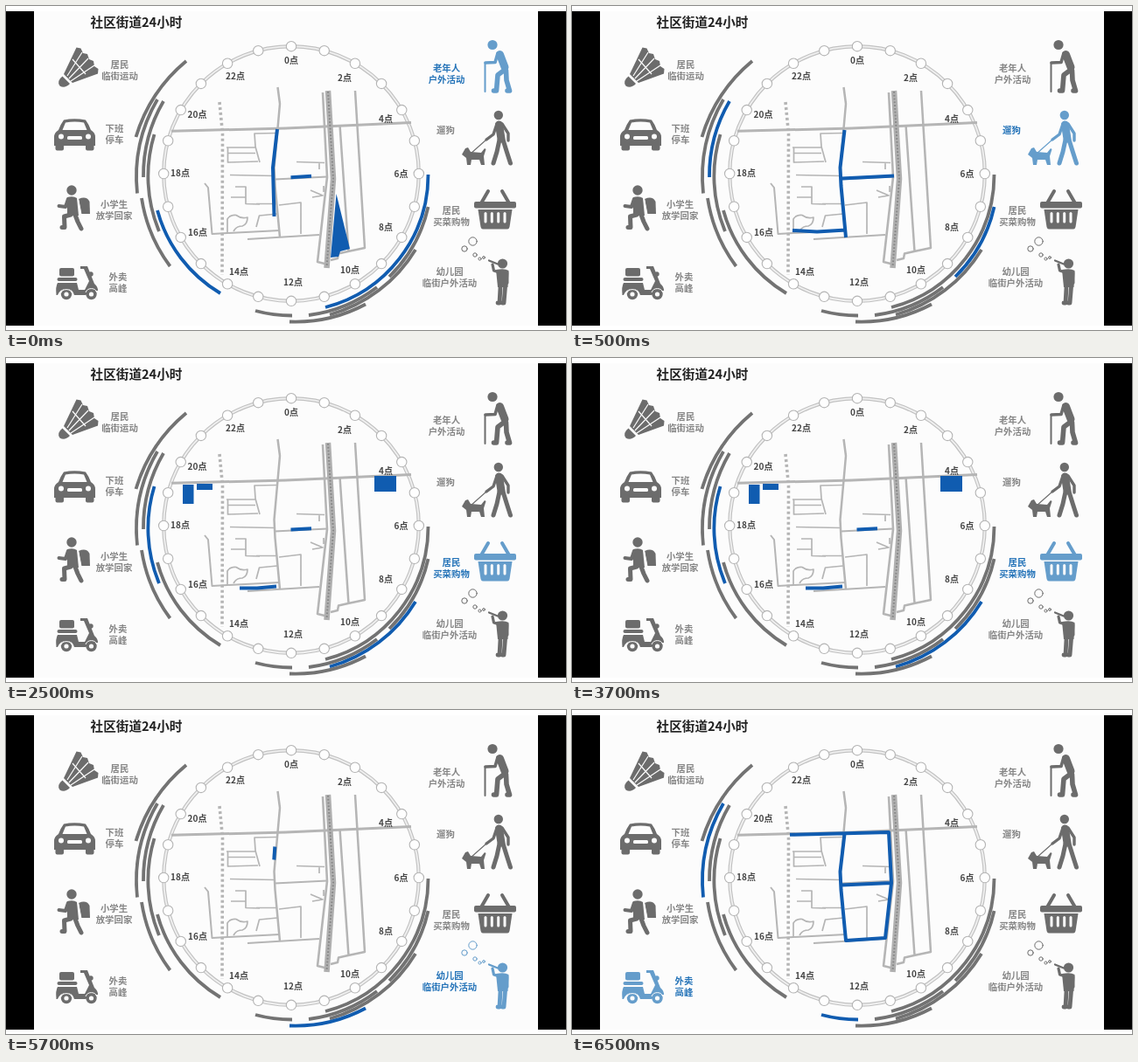
Animation of 640x371 px, one loop 8 s. Source, as an HTML page:

```html
<!DOCTYPE html>
<html lang="zh">
<head>
<meta charset="utf-8">
<title>社区街道24小时</title>
<style>
html, body { margin: 0; width: 100%; height: 100%; overflow: hidden; background: #fff; }
svg { display: block; width: 100vw; height: 100vh; }
text { font-family: "Noto Sans CJK SC", "Noto Sans CJK", "Noto Sans CJK JP", sans-serif; text-anchor: middle; }
.hour { font-size: 10px; fill: #444; font-weight: 700; }
.label { font-size: 10.4px; font-weight: 700; fill: #858585; }
.icon { color: #6c6c6c; fill: currentColor; stroke: none; }
.item.on .label { fill: #2473b8; }
.item.on .icon { color: #659dcb; }
.line { fill: none; stroke: currentColor; stroke-linecap: round; stroke-linejoin: round; }
.cut { fill: #fcfcfc; }
.cutline { fill: none; stroke: #fcfcfc; }
#roads { fill: none; stroke: #b5b5b5; stroke-linejoin: round; }
#arcs { fill: none; stroke: #737373; stroke-width: 3.8; }
#arcs .on { stroke: #105cb0; }
#marks { fill: none; stroke: #105cb0; stroke-width: 4; stroke-linejoin: round; }
#marks .area { fill: #105cb0; stroke: none; }
</style>
</head>
<body>
<svg id="stage" viewBox="0 0 640 371" preserveAspectRatio="none">
  <rect width="640" height="371" fill="#fff"/>
  <rect y="6" width="640" height="360" fill="#000"/>
  <rect x="32" y="6" width="576" height="360" fill="#fcfcfc"/>
  <text x="149" y="24" font-size="14.6" font-weight="700" fill="#222">社区街道24小时</text>
  <g id="arcs"></g>
  <g id="ring"></g>
  <g id="roads"></g>
  <g id="marks"></g>
  <g id="hours"></g>
  <g id="items"></g>
</svg>
<script>
const NS = 'http://www.w3.org/2000/svg';
const CX = 326, CY = 192, R = 145.8;
const byId = id => document.getElementById(id);

function add(parent, tag, attrs, text) {
  const el = document.createElementNS(NS, tag);
  for (const k in attrs) el.setAttribute(k, attrs[k]);
  if (text) el.textContent = text;
  parent.appendChild(el);
  return el;
}

// Clock face
const ring = byId('ring');
add(ring, 'circle', { cx: CX, cy: CY, r: R, fill: 'none', stroke: '#c2c2c2', 'stroke-width': 4.2 });
add(ring, 'circle', { cx: CX, cy: CY, r: R, fill: 'none', stroke: '#f0f0f0', 'stroke-width': 1.8 });
for (let h = 0; h < 24; h++) {
  const a = h * Math.PI / 12;
  add(ring, 'circle', {
    cx: CX + R * Math.sin(a), cy: CY - R * Math.cos(a), r: 5.7,
    fill: '#fefefe', stroke: '#b4b4b4', 'stroke-width': 1.1
  });
}
[[326, 62], [387, 82], [434, 129], [451.5, 192], [434, 253], [393, 302],
 [328, 316], [266, 304], [219, 259], [199, 191], [218.5, 124], [262, 80]]
  .forEach(([x, y], i) => add(byId('hours'), 'text', { class: 'hour', x, y: y + 3.8 }, i * 2 + '点'));

// Activity arcs: radius, start, end (clockwise)
const arcs = [
  [157, 482.5, 193, 365, 345],
  [161.5, 482.5, 230, 438, 310],
  [167, 468, 279, 370, 353.5],
  [171, 411, 341.5, 324, 361.5],
  [162.5, 327, 354.5, 285, 349],
  [162.5, 424, 322, 346, 354],
  [159, 245, 329, 173, 234],
  [169, 157, 196, 180, 109],
  [164, 175, 258, 169.5, 147],
  [177, 150, 214.5, 173, 107],
  [180, 148.5, 150, 206, 63],
  [174.5, 187.5, 298, 155, 220]
].map(([r, x1, y1, x2, y2]) =>
  add(byId('arcs'), 'path', { d: `M${x1} ${y1}A${r} ${r} 0 0 1 ${x2} ${y2}` }));

// Street map
const roads = byId('roads');
const road = (d, w, extra) => add(roads, 'path', { d, 'stroke-width': w, ...extra });
road('M189 143.3L320 140L463 133.5', 3);
road('M244 110L247.5 146L247 308', 3.6, { 'stroke-dasharray': '3 3' });
road('M310.5 93L313 112L306.5 185L307.5 206L313 265', 2.5);
road('M362 99L367 196L356 293L368 296', 2.6);
road('M368 97L374 198L366.5 300', 6.5, { stroke: '#b0b0b0' });
road('M368 98L374 198L366.5 299', 2, { stroke: '#878787', 'stroke-dasharray': '1.8 2' });
road('M381.5 136L391.5 281M399 97L410 277L391 281L380 283.5L379 289L371 291', 2.5);
road('M227 203L231 208L235.5 261L253 260L313 257M276 267L358 262M307 198.5L367 195.5', 2);
road('M252 162H284.5M253.5 162V179L288 178M253 168.5H285M310 145.5L284 146L285 161L290 179' +
  'M256 193.5L307 194.5M262 207H274V226.5L290 227M257 219H274M286 226.5H310' +
  'M253 259V244Q256 239 263 239.5Q269 244 276 242Q276 250 270 252Q263 252 260 258' +
  'M286 253L289.5 240L310 238M312 228L337 225V261M332 178.5L364 179.5M358 179V187M348 211L362 217L350 219M363 206V213', 1.7);

// Icons and labels
const dot = (x, y, r, c = '') => `<circle cx="${x}" cy="${y}" r="${r}" class="${c}"/>`;
const box = (x, y, w, h, r = 0, c = '') => `<rect x="${x}" y="${y}" width="${w}" height="${h}" rx="${r}" class="${c}"/>`;
const shape = (d, c = '') => `<path d="${d}" class="${c}"/>`;
const line = (d, w, c = 'line') => `<path d="${d}" class="${c}" stroke-width="${w}"/>`;
const bubble = (x, y, r) => `<circle cx="${x}" cy="${y}" r="${r}" class="line" stroke-width="1"/>`;

const shuttle =
  shape('M80.5 47.5L85.5 48.5L88 54L93 55L95 61L100 63L101 69L105.5 72L105 77.5L76 88L66 78Z') +
  line('M87 53L70 80M94 60L72 83M101 68L74 86M76 61L91 78', 1.2, 'cutline') +
  shape('M64.5 80.5L73 89Q67 95 61.5 91.5Q57.5 86 64.5 80.5Z');

const car =
  shape('M66 130.5Q78 128 91 130.5Q95 136 97 142Q102 145 102 150V160H55V150Q55 145 60 142Q62 136 66 130.5Z') +
  box(56.5, 157, 9.5, 8.5, 2) + box(91, 157, 9.5, 8.5, 2) +
  shape('M68 133.5Q78.5 131.5 89 133.5L92.5 142H64.5Z', 'cut') +
  dot(63, 149.5, 3, 'cut') + dot(94, 149.5, 3, 'cut') +
  box(70, 149, 17, 4, 1.5, 'cut');

const pupil =
  dot(75, 211, 5.7) +
  shape('M70 219Q77 217 81 220L83 240L70 240Z') +
  line('M71 221L68 230L60.5 229', 4) +
  line('M74 239L66.5 241L67 253.5H64M79 239L82 247L86 255', 5) +
  shape('M83 221Q92 217 95.5 224L96 238H86Z') + line('M82.5 221L86 239', 1.2, 'cutline');

const scooter =
  box(61, 300, 17, 9.5, 2) + box(58.5, 311, 23, 4, 2) +
  shape('M59 317H81L83 325H90L95 315L89 301H85V298H93L101 318Q105 321 105 326H97L91 331H78Q76 323 68 324Q62 324 59 331H57.5Q56.5 321 59 317Z') +
  dot(69, 330, 6.2) + dot(69, 330, 2.6, 'cut') + dot(97.5, 330, 6.2) + dot(97.5, 330, 2.6, 'cut') +
  line('M62.5 329A7 7 0 0 1 75.5 329M91 328A7 7 0 0 1 104 328', 1, 'cutline') +
  dot(97, 307, 2.7);

const elder =
  dot(556, 44.5, 5.6) +
  line('M564.5 55.5L570 70', 9) +
  line('M562 54L559 64.5L548 65', 3.6) + line('M547.5 65V98', 2) +
  line('M570 73L562 79L560.5 97H557.5M571.5 74L572 85L575.5 97H573', 5.6);

const walker =
  dot(562.8, 125, 5.2) +
  line('M563.5 136L566 152', 9) +
  line('M561 135L557 147L549 153M567 135L574 146L574 154', 3.4) +
  line('M564 153L561 167L557 180M568 153L572 166L576.5 180', 5) +
  line('M549 153L531 169', 1.1) +
  shape('M521 170L525 163L528 162L531 167L543 168L547 163L548.5 164L546 172L547 182H543L541 176H532L531 182H527L526 174Z');

const basket =
  line('M543.5 225L551 212M574.5 225L567 212', 4) +
  box(535, 224, 48, 7.5, 2) + shape('M539.5 233H578.5L575.5 253Q575 255.5 572.5 255.5H545.5Q543 255.5 542.5 253Z') +
  [548, 555.3, 562.7, 570].map(x => box(x - 1.5, 236, 3, 12.5, 1.5, 'cut')).join('');

const child =
  bubble(533.5, 269.5, 4.7) + bubble(524, 278, 3.2) + bubble(536, 285, 2.2) + bubble(541.5, 289.5, 1.6) + bubble(546, 288, 1.4) +
  dot(567.5, 295, 5.6) + line('M552 291.5L562 295.5', 2.2) +
  shape('M560 302Q570 300 574.5 303L573.5 322H562Z') +
  line('M564 305L557.5 303L556 296', 3.2) + line('M573 305L573 317', 3) +
  line('M565 322L564 340H562M570.5 322L569 340H567', 4.8);

const items = [
  [shuttle, 130, 67, '居民', '临街运动'],
  [car, 124, 140, '下班', '停车'],
  [pupil, 123.5, 227, '小学生', '放学回家'],
  [scooter, 128, 310, '外卖', '高峰'],
  [elder, 503.5, 71, '老年人', '户外活动'],
  [walker, 502.5, 142, '遛狗'],
  [basket, 509, 234, '居民', '买菜购物'],
  [child, 507, 304, '幼儿园', '临街户外活动']
].map(([art, x, y, ...rows]) => {
  const g = add(byId('items'), 'g', { class: 'item' });
  add(g, 'g', { class: 'icon' }).innerHTML = art;
  rows.forEach((row, i) => add(g, 'text', { class: 'label', x, y: y + 3.9 + i * 13 }, row));
  return g;
});

// Each scene: active item, active arcs, highlighted streets, highlighted areas
const scenes = [
  { item: 4, arcs: [0, 6], streets: 'M310 141L305 185L306.5 241M325.5 196.3L349 194.8', areas: 'M377.5 215L393 278L382 281L380 287L371 288Z' },
  { item: 5, arcs: [1, 7], streets: 'M311.5 142L306.5 185L307.5 206L313 265M308 197.5L368 194.5M252 257L280 258.5L313 256.5' },
  { item: 6, arcs: [2, 8], streets: 'M325.5 196.5L349 195.3M267 263.5H287L309 261.5', areas: 'M202 145H214.5V167H202ZM218 144H236V151H218ZM421 135H446V153H421Z' },
  { item: 7, arcs: [3], streets: 'M307.3 156.5L306.3 171.5' },
  { item: 3, arcs: [4, 9], streets: 'M249 142.8L362 140L365 198L358 261L313 264L307.5 206L306.5 185L311.5 142M307.5 200.5L365 198' }
];
scenes.forEach(s => {
  s.g = add(byId('marks'), 'g', {});
  add(s.g, 'path', { d: s.streets });
  if (s.areas) add(s.g, 'path', { d: s.areas, class: 'area' });
});

let shown = -1;
function draw(ms) {
  const n = Math.floor((ms % 8000 + 1500) / 2000);
  if (n === shown) return;
  shown = n;
  const now = scenes[n];
  scenes.forEach(s => s.g.setAttribute('visibility', s === now ? 'visible' : 'hidden'));
  items.forEach((el, i) => el.classList.toggle('on', i === now.item));
  arcs.forEach((el, i) => el.classList.toggle('on', now.arcs.includes(i)));
}

const start = performance.now();
function tick() {
  draw(performance.now() - start);
  requestAnimationFrame(tick);
}
tick();
</script>
</body>
</html>
```
